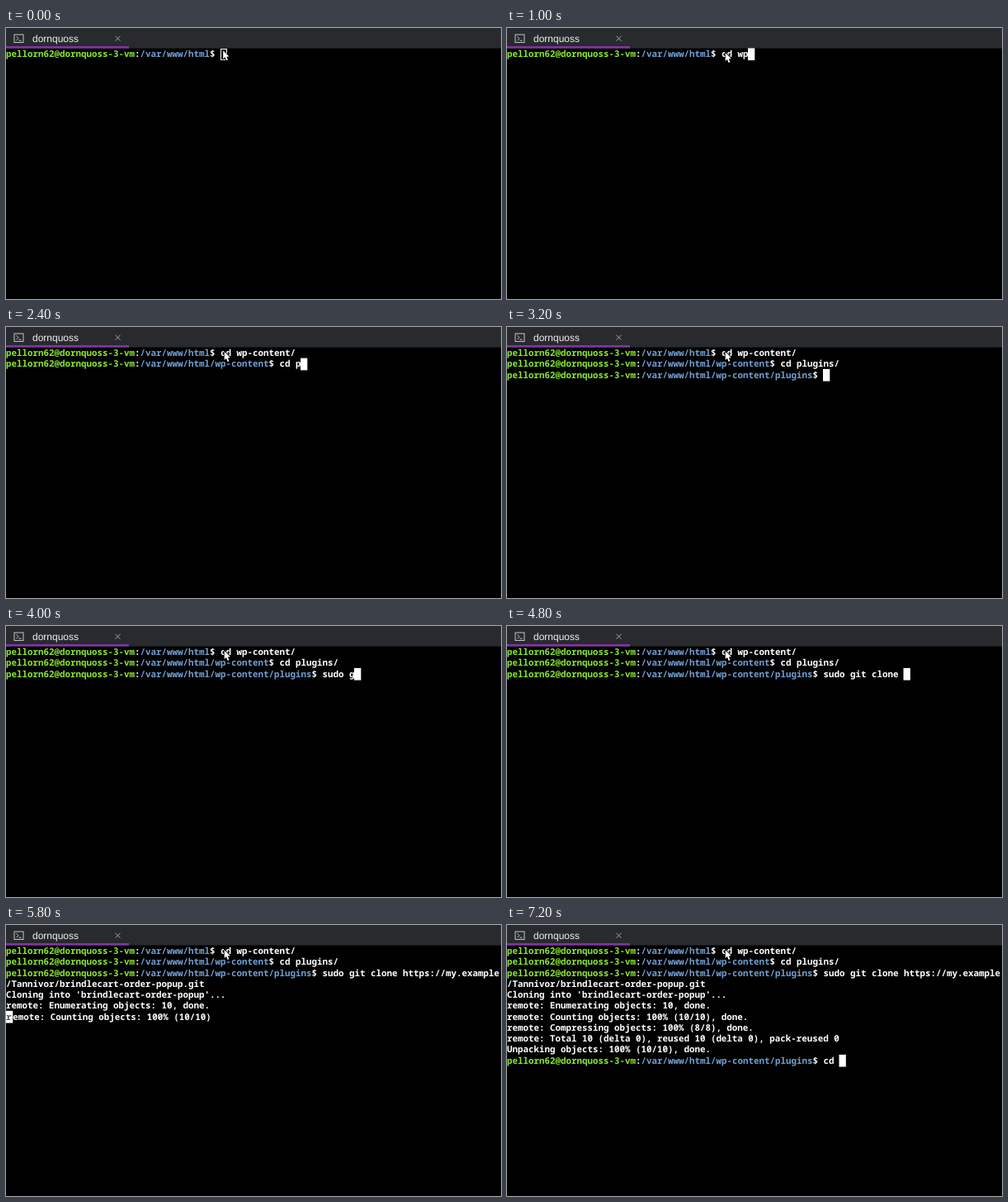
An HTML page with a canvas that plays this animation: 600 px wide and 328 px high, repeating every 8000 ms.

```html
<!DOCTYPE html>
<html lang="en">
<head>
<meta charset="utf-8">
<title>Terminal session</title>
<style>
  html, body { margin: 0; width: 100%; height: 100%; overflow: hidden; background: #000; }
  canvas { display: block; }
</style>
</head>
<body>
<canvas id="stage" width="600" height="328"></canvas>
<script>
const ctx = document.getElementById('stage').getContext('2d');
ctx.textRendering = 'geometricPrecision';

const LOOP = 8000, CELL = 6.5, ROW = 13.25, TOP = 25, CARET = 8.3;
const MONO = '10.83px "Noto Sans Mono", monospace';
const GREEN = '#8ae92c', BLUE = '#719fd3', WHITE = '#fff';
const HOST = 'dornquoss', USER = `pellorn62@${HOST}-3-vm`;
const REPO = 'brindlecart-order-popup';

// Working directory of each row that starts with a prompt
const ROOT = '/var/www/html', PLUGINS = ROOT + '/wp-content/plugins';
const prompts = { 0: ROOT, 1: ROOT + '/wp-content', 2: PLUGINS, 10: PLUGINS };

// Time, row, text of that row, and whether the caret sits on its first letter
const counting = 'remote: Counting objects: 100% (10/10)';
const events = [
  [0, 0, ''],
  [400, 0, 'c'], [600, 0, 'cd'], [800, 0, 'cd '], [1000, 0, 'cd wp'],
  [1400, 0, 'cd wp-'], [1600, 0, 'cd wp-c'], [1800, 0, 'cd wp-content/'],
  [2000, 1, ''], [2200, 1, 'cd '], [2400, 1, 'cd p'],
  [2600, 1, 'cd pl'], [2800, 1, 'cd plugins/'],
  [3200, 2, ''],
  [3600, 2, 'su'], [3800, 2, 'sudo'], [4000, 2, 'sudo g'],
  [4200, 2, 'sudo git'], [4400, 2, 'sudo git c'], [4600, 2, 'sudo git clo'],
  [4800, 2, 'sudo git clone '],
  [5000, 2, 'sudo git clone https://my.example'],
  [5000, 3, `/Tannivor/${REPO}.git`],
  [5600, 4, `Cloning into '${REPO}'...`],
  [5600, 5, ''],
  [5800, 5, 'remote: Enumerating objects: 10, done.'],
  [5800, 6, counting, true],
  [6000, 6, counting + ', done.'],
  [6000, 7, 'remote: Compressing objects: 100% (8/8), done.'],
  [6000, 8, 'remote: Total 10 (delta 0), reused 10 (delta 0), pack-reused 0'],
  [6000, 9, 'Unpacking objects: 100% (10/10), done.'],
  [6000, 10, ''],
  [7200, 10, 'cd ']
];

// Returns the x position after the text
function write(text, x, row, color = WHITE, weight = 600) {
  ctx.font = `${weight} ${MONO}`;
  ctx.fillStyle = color;
  ctx.fillText(text, x, TOP + 10.2 + row * ROW);
  return x + text.length * CELL;
}

function drawRow(row, text) {
  let x = 0;
  if (row in prompts) {
    x = write(USER, x, row, GREEN, 700);
    x = write(':', x, row);
    x = write(prompts[row], x, row, BLUE);
    x = write('$ ', x, row);
  }
  return write(text, x, row);
}

function drawCaret(x, row, focused) {
  if (focused) {
    ctx.fillStyle = WHITE;
    ctx.fillRect(Math.max(0, x - 0.5), TOP - 0.6 + row * ROW, CARET, 14.7);
  } else {
    ctx.strokeStyle = WHITE;
    ctx.lineWidth = 1;
    ctx.strokeRect(260.5, 25.5, 7, 13);
  }
}

// The caret cell is wider than a letter and pushes the rest of its row along
function drawRowUnderCaret(row, text) {
  drawCaret(0, row, true);
  write(text[0], 0, row, '#555');
  write(text.slice(1), CARET, row);
}

function line(points) {
  ctx.beginPath();
  points.forEach(([x, y]) => ctx.lineTo(x, y));
}

function drawTab() {
  ctx.fillStyle = '#282a2e';
  ctx.fillRect(0, 0, 600, 24.6);
  ctx.fillStyle = '#7f349f';
  ctx.fillRect(0, 22, 149, 2.7);
  ctx.fillStyle = '#f0f0f1';
  ctx.font = '12px "Liberation Sans", Arial, sans-serif';
  ctx.fillText(HOST, 32, 16.7);

  ctx.strokeStyle = '#c4c6c9';
  ctx.lineWidth = 1;
  ctx.strokeRect(10, 8, 11, 9.5);
  line([[12.5, 10.2], [15, 12.7], [12.5, 15.2]]);
  ctx.stroke();
  line([[15.5, 15.2], [18.5, 15.2]]);
  ctx.stroke();

  ctx.strokeStyle = '#a5a7aa';
  for (const side of [-3, 3]) {
    line([[135.5 - side, 9.7], [135.5 + side, 15.7]]);
    ctx.stroke();
  }
}

function drawPointer(x, y) {
  ctx.save();
  ctx.translate(x, y);
  line([[0, 0], [0, 10], [2.3, 8], [4, 12], [5.7, 11.3], [4.1, 7.5], [7.2, 7.3]]);
  ctx.closePath();
  ctx.fillStyle = WHITE;
  ctx.strokeStyle = '#000';
  ctx.lineWidth = 1.4;
  ctx.stroke();
  ctx.fill();
  ctx.restore();
}

function draw(t) {
  ctx.fillStyle = '#000';
  ctx.fillRect(0, 0, 600, 328);
  drawTab();

  const past = events.filter(([time]) => time <= t);
  const [, caretRow, , caretAtStart] = past[past.length - 1];
  const rows = new Map(past.map(([, row, text]) => [row, text]));
  const focused = t >= 200;

  rows.forEach((text, row) => {
    if (row === caretRow && caretAtStart) return drawRowUnderCaret(row, text);
    const end = drawRow(row, text);
    if (row === caretRow) drawCaret(end, row, focused);
  });
  if (focused) drawPointer(264.7, 30);
  else drawPointer(263.2, 27.3);
}

function tick() {
  draw(performance.now() % LOOP);
  requestAnimationFrame(tick);
}
tick();
</script>
</body>
</html>
```
